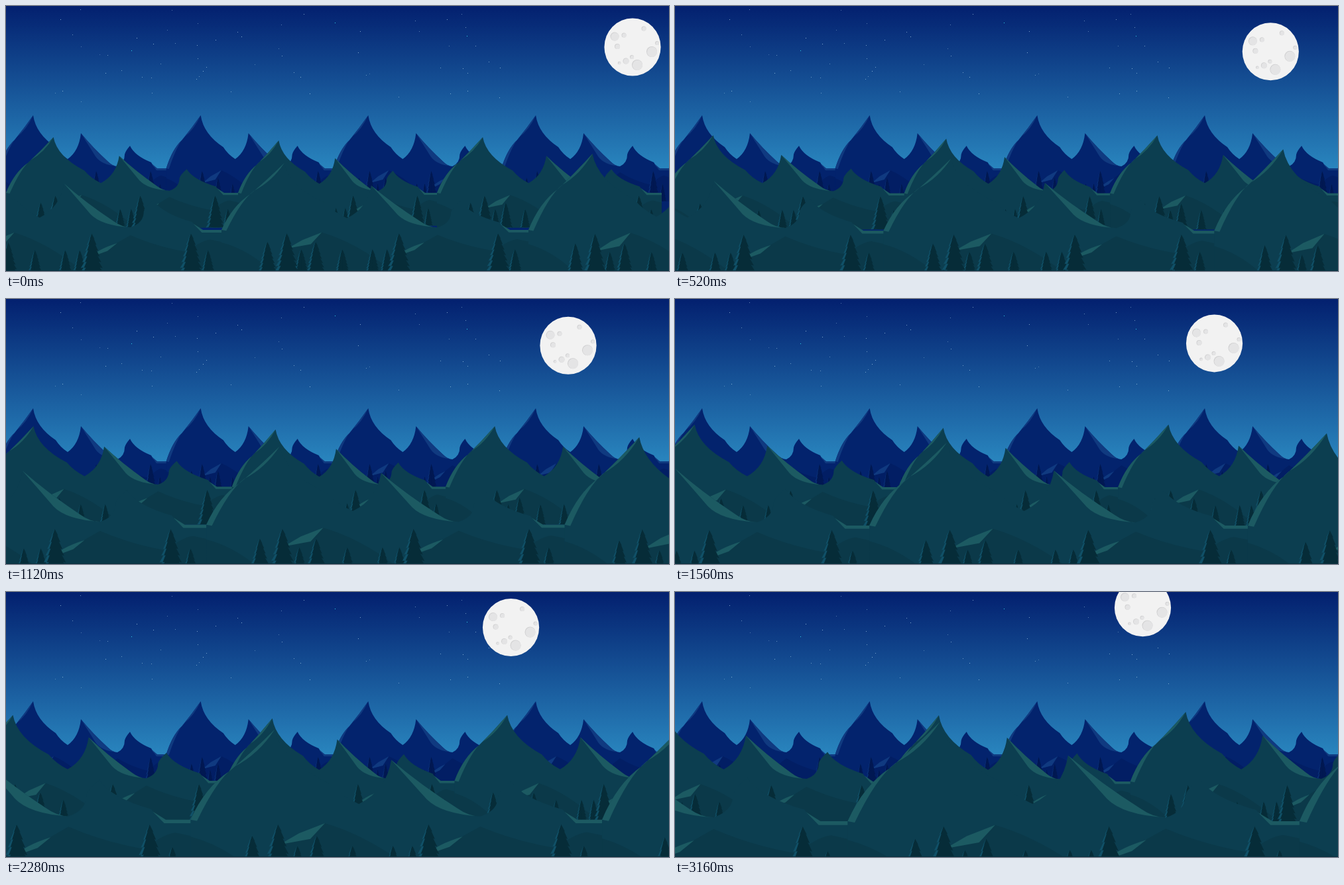
Recreate the animation shown at these times as an HTML page with a canvas. Size 1000 by 400 pixels, loop 3.2 s.

```html
<!DOCTYPE html>
<html lang="en">
<head>
<meta charset="utf-8">
<title>Night mountains</title>
<style>
html, body { margin: 0; width: 100%; height: 100%; overflow: hidden; background: #03236d; }
canvas { display: block; width: 100vw; height: 100vh; }
</style>
</head>
<body>
<canvas id="stage" width="1000" height="400"></canvas>
<script>
const ctx = document.getElementById('stage').getContext('2d');
const LOOP = 3200, STEP = 40;

const BLUE = { body: '#03236d', light: '#103a80', hill: '#021e64', tree: '#011852', rim: '#0a3077' };
const TEAL = { body: '#0c3e50', light: '#1c5a62', hill: '#0b3949', tree: '#062c38', rim: '#105067' };

// One range of three peaks, in units measured from the tip of the highest one.
const LEFT = -52, SPAN = 255, DEPTH = 80, BOTTOM = 130;
const BODY = new Path2D(`M-52 130V80Q-43 51-28 37Q-14 20 0 0Q4 28 34 48Q41 59 52 66Q69 54 72 27
  Q90 49 113 70Q120 77 127 77Q138 72 138 59Q139 54 146 46Q153 61 178 71Q182 79 187 80H203V130Z`);
const HILLS = new Path2D(`M-10 130L4 103L31 83Q60 95 90 130ZM90 130L94 112L127 86Q160 106 203 110V130Z
  M168 130V112Q184 92 193 91L203 94V130ZM-52 95Q-30 103-10 130H-52Z`);
const STREAKS = new Path2D('M31 83L15 92L3 102L22 97ZM116 95Q100 102 94 111L108 104Z');
const LIGHTS = new Path2D(`M-52 80Q-43 51-28 37Q-14 20 0 0Q-10 22-25 33Q-36 45-48 81Z
  M72 27Q90 49 113 70Q120 77 127 77Q103 75 94 62Q84 46 72 27ZM179 73L187 80H203V83H186Z`);

// Tree tops by height, each with the places where such trees stand.
const TREES = [[94, [-14, 26]], [103, [14, 48, 73, 85, 191]], [84, [2, 95, 177]]];

// Rows of ranges zoom outwards from a centre while their tips rise.
const ROWS = [
  { edges: [0, 350, 650, 988], tips: [198, 203, 198], base: 282, sink: 4, rise: 17, zoom: .21, centre: 475 },
  { edges: [-139, 325, 788, 1260], tips: [232, 237, 223], base: 338, sink: 8, rise: 41, zoom: .472, centre: 462 }
];

const CRATERS = [[-27, -16, 6.5], [-13, -18, 3.5], [-23, -1, 4], [17, -28, 3.5], [29, 7, 8],
  [7, 27, 8], [-10, 21, 4.5], [-1, 15, 3], [-20, 24, 2.3], [37, -6, 3]];

function fill(color, path) {
  ctx.fillStyle = color;
  ctx.fill(path);
}

function oval(x, y, rx, ry, color) {
  const path = new Path2D();
  path.ellipse(x, y, rx, ry, 0, 0, 7);
  fill(color, path);
}

// Jagged cone; the two sides may differ in width.
function fir(x, top, left, right) {
  const path = new Path2D(), rows = 7, h = BOTTOM - top;
  for (const side of [-left, right]) {
    path.moveTo(x, top);
    for (let i = 1; i <= rows; i++) {
      const y = top + h * i / rows, w = side * .22 * h * (i / rows) ** .75;
      path.lineTo(x + w, y);
      path.lineTo(x + w * .75, y - .6);
    }
    path.lineTo(x, BOTTOM);
  }
  return path;
}

const FIRS = TREES.flatMap(([top, places]) =>
  places.map(x => ({ rim: fir(x, top, 1, .8), tree: fir(x, top, .72, 1) })));

function range(x, y, sx, sy, c) {
  ctx.save();
  ctx.translate(x, y);
  ctx.scale(sx, sy);
  fill(c.body, BODY);
  fill(c.hill, HILLS);
  fill(c.light, STREAKS);
  for (const f of FIRS) {
    fill(c.rim, f.rim);
    fill(c.tree, f.tree);
  }
  fill(c.light, LIGHTS);
  ctx.restore();
}

function row(r, s) {
  const edges = r.edges.map(x => x + (x - r.centre) * r.zoom * s);
  r.tips.forEach((start, i) => {
    const tip = start - r.rise * s;
    const sx = (edges[i + 1] - edges[i]) / SPAN * 1.003;
    range(edges[i] - LEFT * sx, tip, sx, (r.base + r.sink * s - tip) / DEPTH, TEAL);
  });
}

function stars() {
  let seed = 7;
  const rnd = () => (seed = seed * 16807 % 2147483647) / 2147483647;
  rnd();
  for (let i = 0; i < 62; i++) {
    const x = 60 + rnd() * 690 | 0, y = 5 + rnd() * 140 | 0;
    ctx.fillStyle = i % 30 ? `rgba(190,225,240,${.3 + rnd() * .4})` : '#2fd0e8';
    ctx.fillRect(x, y, 1, 1);
  }
}

function moon(s) {
  const x = 945 - 292.5 * s + 53 * s * s, y = 62 + 57 * s - 95.3 * s * s;
  oval(x, y, 42.6, 43.5, '#f2f2f2');
  for (const [dx, dy, r] of CRATERS) {
    oval(x + dx, y + dy, r, r, '#cfcfd0');
    oval(x + dx + .5, y + dy + .4, r - .4, r - .4, '#e4e4e5');
  }
}

const sky = ctx.createLinearGradient(0, 0, 0, 245);
sky.addColorStop(0, '#03206f');
sky.addColorStop(1, '#2985be');

function draw(now) {
  const s = Math.floor(now % LOOP / STEP) * STEP / (LOOP - STEP);
  ctx.fillStyle = sky;
  ctx.fillRect(0, 0, 1000, 400);
  stars();
  moon(s);
  ctx.fillStyle = BLUE.body;
  ctx.fillRect(0, 285, 1000, 115);
  for (let i = 0; i < 5; i++) range(41 + 252.7 * i, 165, 1, 1, BLUE);
  ROWS.forEach(r => row(r, s));
  ctx.fillStyle = '#082f3d';
  ctx.fillRect(0, 399, 1000, 1);
  requestAnimationFrame(draw);
}
requestAnimationFrame(draw);
</script>
</body>
</html>
```
